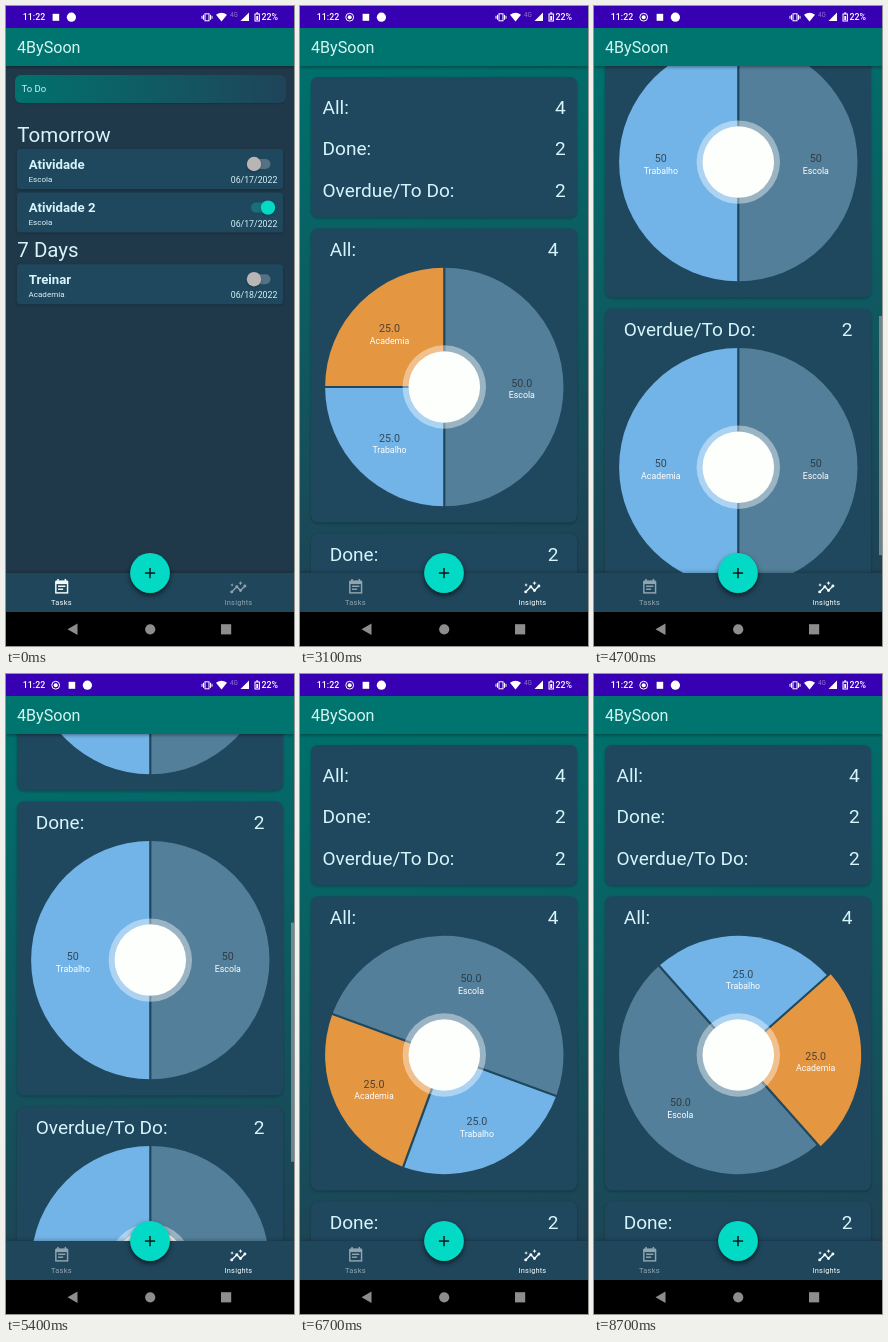
An HTML page with a canvas for the animation above (9.2 s loop, 288 px wide and 640 px high).

```html
<!DOCTYPE html>
<html lang="en">
<head>
<meta charset="utf-8">
<title>Task list</title>
<style>
html, body { margin: 0; width: 100%; height: 100%; overflow: hidden; background: #000; }
canvas { display: block; width: 288px; height: 640px; }
</style>
</head>
<body>
<canvas id="stage"></canvas>
<script>
const W = 288, H = 640, LOOP = 9200, STEP = 100;
const canvas = document.getElementById('stage');
const ctx = canvas.getContext('2d');
const dpr = window.devicePixelRatio || 1;
canvas.width = W * dpr;
canvas.height = H * dpr;

const CARD = '#1f475d', PALE = '#d6f4fa', TEAL = '#03dac5';
const ORANGE = '#e59641', BLUE = '#72b4e7', SLATE = '#547f9a';
const VIEW = { top: 60, bottom: 567, content: 1075 };

// Keyed values as [time, value] pairs
const SCROLL = [[3700, 0], [3850, 85], [4000, 240], [4200, 300], [4450, 325], [4700, 530],
  [4900, 568], [5150, 568], [5400, 400], [5650, 130], [5900, 0]];
const SPIN = [[6200, 0], [6600, -50], [7000, -140], [7400, -196.6], [7800, -201], [8200, -221.6]];
const PAGE = [[2200, 0], [2500, 1]];
const BADGE = [[100, 0], [500, 1]];
const BAR = [[3700, 0], [3800, 1], [6200, 1], [6500, 0]];

// Monotone cubic interpolation
function track(t, keys) {
  const last = keys.length - 1;
  if (t <= keys[0][0]) return keys[0][1];
  if (t >= keys[last][0]) return keys[last][1];
  const slope = i => (keys[i + 1][1] - keys[i][1]) / (keys[i + 1][0] - keys[i][0]);
  const tangent = i => {
    if (i === 0 || i === last) return 0;
    const a = slope(i - 1), b = slope(i);
    return a * b <= 0 ? 0 : 2 * a * b / (a + b);
  };
  let i = 0;
  while (t > keys[i + 1][0]) i++;
  const span = keys[i + 1][0] - keys[i][0];
  const u = (t - keys[i][0]) / span, v = 1 - u;
  return keys[i][1] * v * v * (1 + 2 * u) + keys[i + 1][1] * u * u * (3 - 2 * u)
    + span * u * v * (tangent(i) * v - tangent(i + 1) * u);
}

function text(str, x, y, size, color = PALE, align = 'left', weight = 400) {
  ctx.font = `${weight} ${size}px Roboto, sans-serif`;
  ctx.textAlign = align;
  ctx.fillStyle = color;
  ctx.fillText(str, x, y);
}

function rect(x, y, w, h, color) {
  ctx.fillStyle = color;
  ctx.fillRect(x, y, w, h);
}

function round(x, y, w, h, r, color) {
  ctx.fillStyle = color;
  ctx.beginPath();
  ctx.roundRect(x, y, w, h, r);
  ctx.fill();
}

function disc(x, y, r, color) {
  ctx.fillStyle = color;
  ctx.beginPath();
  ctx.arc(x, y, r, 0, Math.PI * 2);
  ctx.fill();
}

function poly(points, color) {
  ctx.fillStyle = color;
  ctx.beginPath();
  points.forEach(([x, y]) => ctx.lineTo(x, y));
  ctx.fill();
}

function gradient(x0, y0, x1, y1, from, to) {
  const g = ctx.createLinearGradient(x0, y0, x1, y1);
  g.addColorStop(0, from);
  g.addColorStop(1, to);
  return g;
}

function raised(blur, dy, alpha, draw) {
  ctx.save();
  ctx.shadowColor = `rgba(0,0,0,${alpha})`;
  ctx.shadowBlur = blur * dpr;
  ctx.shadowOffsetY = dy * dpr;
  draw();
  ctx.restore();
}

function card(y, h, r) {
  raised(3, 1, 0.28, () => round(11, y, 266, h, r, CARD));
}

function task(y, title, tag, date, done) {
  card(y, 40, 3);
  text(title, 22.7, y + 19.5, 13.2, PALE, 'left', 700);
  text(tag, 22.5, y + 32.8, 8.07);
  text(date, 271.3, y + 34, 8.75, PALE, 'right');
  const cy = y + 15;
  round(245, cy - 5, 19.5, 10, 5, done ? '#17717a' : '#557184');
  raised(2, 0.7, 0.3, () => disc(done ? 262 : 248, cy, 7.2, done ? TEAL : '#b9b5b5'));
}

function tasksPage() {
  rect(0, VIEW.top, W, 507, '#20394a');
  raised(2, 1, 0.2, () => round(9, 69, 271, 28, 6, gradient(9, 0, 280, 0, '#00726d', '#1f445a')));
  text('To Do', 15.6, 86.4, 9.53);
  text('Tomorrow', 11.3, 135.8, 20.5);
  task(143, 'Atividade', 'Escola', '06/17/2022', false);
  task(186.6, 'Atividade 2', 'Escola', '06/17/2022', true);
  text('7 Days', 11.3, 251.2, 20.5);
  task(258.2, 'Treinar', 'Academia', '06/18/2022', false);
}

// Slices run clockwise from the top: [name, percent, label, color]
const ALL = [['Escola', 50, '50.0', SLATE], ['Trabalho', 25, '25.0', BLUE], ['Academia', 25, '25.0', ORANGE]];
const DONE = [['Escola', 50, '50', SLATE], ['Trabalho', 50, '50', BLUE]];
const OVERDUE = [['Escola', 50, '50', SLATE], ['Academia', 50, '50', BLUE]];

function pie(cy, slices, spin, picked) {
  const cx = 144.3, r = 119.2, labels = [], edges = [];
  let a = (spin - 90) * Math.PI / 180;
  for (const [name, share, value, color] of slices) {
    const b = a + share / 50 * Math.PI, mid = (a + b) / 2;
    ctx.fillStyle = color;
    ctx.beginPath();
    ctx.moveTo(cx, cy);
    ctx.arc(cx, cy, name === picked ? r + 3.67 : r, a, b);
    ctx.fill();
    edges.push(a);
    labels.push([name, value, cx + Math.cos(mid) * r * 0.65, cy + Math.sin(mid) * r * 0.65]);
    a = b;
  }
  ctx.strokeStyle = CARD;
  ctx.lineWidth = 2.2;
  for (const e of edges) {
    ctx.beginPath();
    ctx.moveTo(cx, cy);
    ctx.lineTo(cx + Math.cos(e) * 125, cy + Math.sin(e) * 125);
    ctx.stroke();
  }
  disc(cx, cy, r * 0.35, 'rgba(255,255,255,0.41)');
  disc(cx, cy, r * 0.3, '#fdfffc');
  for (const [name, value, x, y] of labels) {
    text(value, x, y, 10.7, 'rgba(34,42,48,0.78)', 'center');
    text(name, x, y + 11.4, 8.8, '#fff', 'center');
  }
}

function chart(y, title, count, slices, spin, picked) {
  if (y > VIEW.bottom || y + 294 < VIEW.top) return;
  card(y, 294, 7);
  text(title, 29.7, y + 27.6, 19.07);
  text(count, 258.5, y + 27.6, 19.07, PALE, 'right');
  pie(y + 158.5, slices, spin, picked);
}

function insightsPage(t) {
  const y = -track(t, SCROLL);
  rect(0, VIEW.top, W, 507, gradient(100, 60, 188, 567, '#006f6b', '#1e4355'));
  card(y + 71, 140.5, 7);
  [['All:', 4], ['Done:', 2], ['Overdue/To Do:', 2]].forEach(([name, n], i) => {
    const base = y + 107.5 + i * 41.6;
    text(name, 22.5, base, 19.07);
    text(n, 265.8, base, 19.07, PALE, 'right');
  });
  chart(y + 222.5, 'All:', 4, ALL, track(t, SPIN), t >= 8500 ? 'Academia' : '');
  chart(y + 527.6, 'Done:', 2, DONE, 0);
  chart(y + 832.7, 'Overdue/To Do:', 2, OVERDUE, 0);

  const k = 507 / VIEW.content;
  rect(285, VIEW.top - y * k, 3, 507 * k, `rgba(150,166,172,${0.65 * track(t, BAR)})`);
}

function statusBar(t) {
  const badge = track(t, BADGE), dx = badge * 16;
  rect(0, 0, W, 22, '#3700b3');
  text('11:22', 16.8, 14.4, 8.8, '#fff', 'left', 500);
  if (badge > 0) {
    ctx.globalAlpha = badge;
    ctx.strokeStyle = '#fff';
    ctx.lineWidth = 1;
    ctx.beginPath();
    ctx.arc(49.7, 11.2, 3.9, 0, Math.PI * 2);
    ctx.stroke();
    disc(49.7, 11.2, 2, '#fff');
    ctx.globalAlpha = 1;
  }
  rect(46.6 + dx, 7.8, 6.6, 7, '#fff');
  disc(65.4 + dx, 11.2, 4.6, '#fff');

  // Vibrate, wifi, network, signal, battery
  ctx.strokeStyle = '#fff';
  ctx.lineWidth = 1;
  ctx.strokeRect(199, 7.8, 4, 7);
  for (const s of [-1, 1]) {
    rect(200.5 + s * 3.5, 8.8, 1, 5, '#fff');
    rect(200.5 + s * 5, 9.8, 1, 3, '#fff');
  }
  ctx.fillStyle = '#fff';
  ctx.beginPath();
  ctx.moveTo(215.5, 15.4);
  ctx.lineTo(210, 8.8);
  ctx.quadraticCurveTo(215.5, 4.8, 221, 8.8);
  ctx.fill();
  text('4G', 228, 11, 6.4, 'rgba(255,255,255,0.45)', 'center');
  poly([[234.5, 15], [243, 15], [243, 6.6]], '#fff');
  ctx.strokeRect(249, 8, 4.4, 7);
  rect(250.2, 6.4, 2, 1.4, '#fff');
  rect(250.3, 10, 1.8, 4, '#fff');
  text('22%', 255.6, 14.4, 8.8, '#fff', 'left', 500);
}

function appBar() {
  raised(3, 1.5, 0.35, () => rect(0, 22, W, 38, '#007570'));
  text('4BySoon', 11, 47, 16.1, '#d3f5f2');
}

// Icons are drawn on a 24 unit grid
function icon(cx, cy, draw) {
  ctx.save();
  ctx.translate(cx, cy);
  ctx.scale(0.7333, 0.7333);
  ctx.translate(-12, -12);
  draw();
  ctx.restore();
}

function notes(color) {
  ctx.strokeStyle = color;
  ctx.lineWidth = 2;
  ctx.strokeRect(4, 5, 16, 15);
  rect(4, 3, 16, 5, color);
  rect(6, 1, 2, 3, color);
  rect(16, 1, 2, 3, color);
  rect(7, 10, 10, 2, color);
  rect(7, 14, 7, 2, color);
}

function trend(color) {
  const dots = [[3, 18], [10, 11], [15, 16], [21, 10]];
  ctx.strokeStyle = color;
  ctx.lineWidth = 1.9;
  ctx.beginPath();
  dots.forEach(([x, y]) => ctx.lineTo(x, y));
  ctx.stroke();
  dots.forEach(([x, y]) => disc(x, y, 2, color));
  for (const [x, y, r] of [[15, 6, 3], [3.5, 8.5, 2.5]]) {
    const q = r * 0.3;
    poly([[x, y - r], [x + q, y - q], [x + r, y], [x + q, y + q],
      [x, y + r], [x - q, y + q], [x - r, y], [x - q, y - q]], color);
  }
}

function bottomBar(onInsights) {
  const on = '#f4fbfd', off = '#8fa4af';
  const left = onInsights ? off : on, right = onInsights ? on : off;
  raised(4, -1, 0.25, () => rect(0, 567, W, 39, '#20465c'));
  icon(55.7, 581, () => notes(left));
  icon(232.3, 581.5, () => trend(right));
  ctx.letterSpacing = '0.2px';
  text('Tasks', 55.4, 599.4, 7.5, left, 'center');
  text('Insights', 232.5, 599.4, 7.4, right, 'center');
  ctx.letterSpacing = '0px';

  raised(5, 2.5, 0.6, () => disc(144, 567, 19.9, TEAL));
  rect(138.9, 566.3, 10.2, 1.5, '#061a1a');
  rect(143.25, 562, 1.5, 10.2, '#061a1a');

  const grey = '#8d8d8d';
  rect(0, 606, W, 34, '#000');
  poly([[61.5, 623.3], [71.5, 617.6], [71.5, 629]], grey);
  disc(144.2, 623.3, 5.1, grey);
  rect(215, 618.2, 10.2, 10.2, grey);
}

function render(t) {
  const page = track(t, PAGE);
  ctx.setTransform(dpr, 0, 0, dpr, 0, 0);
  ctx.save();
  ctx.beginPath();
  ctx.rect(0, VIEW.top, W, 507);
  ctx.clip();
  if (page < 1) tasksPage();
  if (page > 0) {
    ctx.globalAlpha = page;
    insightsPage(t);
  }
  ctx.restore();
  appBar();
  statusBar(t);
  bottomBar(page > 0);
}

const start = performance.now();
function frame() {
  const t = (performance.now() - start) % LOOP;
  render(Math.floor(t / STEP) * STEP);
  requestAnimationFrame(frame);
}
frame();
</script>
</body>
</html>
```
